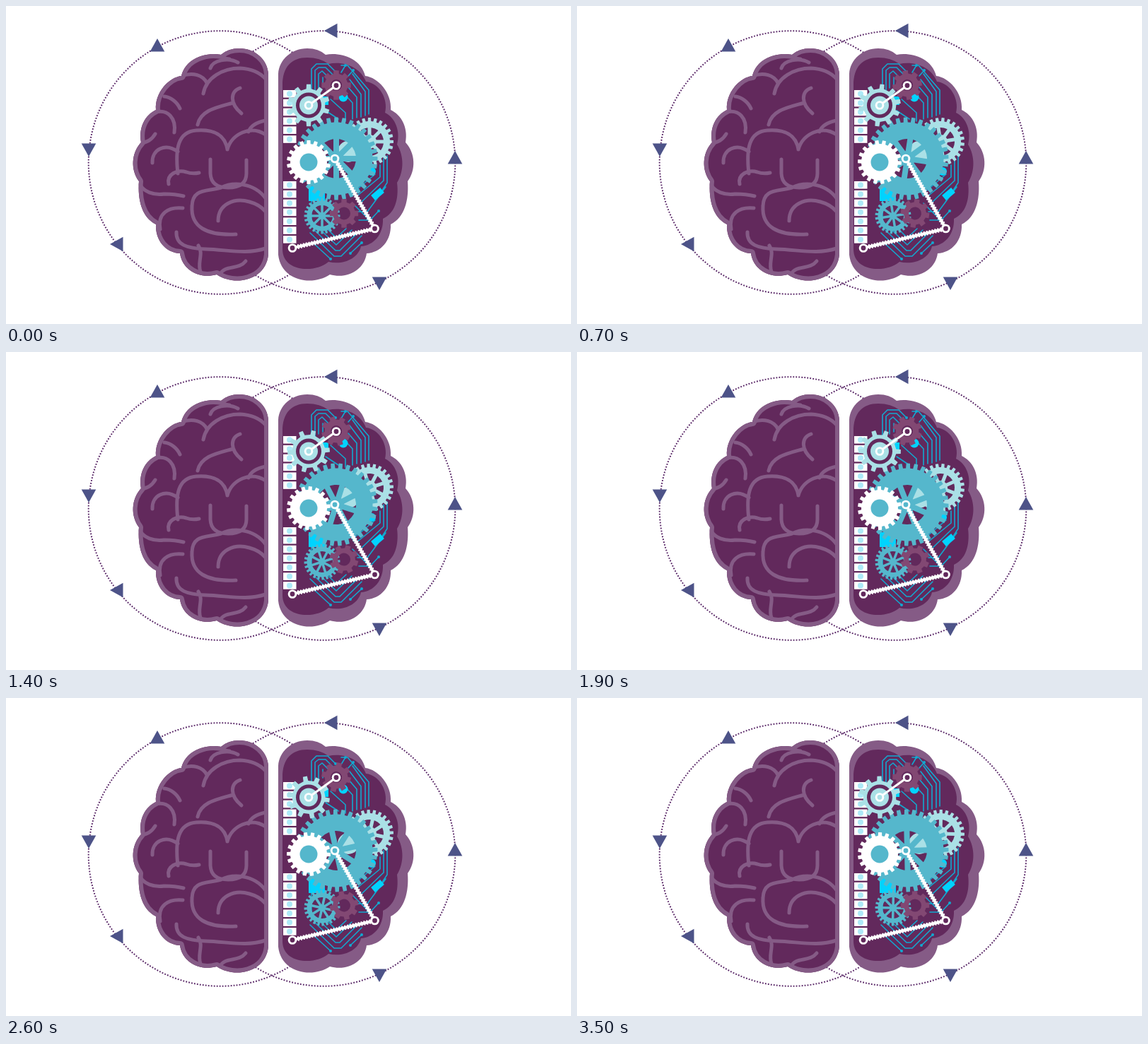
Animation, 799 px wide and 450 px high, one loop 3.6 s. Source, as an HTML page with a canvas:

```html
<!DOCTYPE html>
<html lang="en">
<head>
<meta charset="utf-8">
<title>Brain and gears</title>
<style>
html, body { margin: 0; width: 100%; height: 100%; overflow: hidden; background: #fff; }
canvas { display: block; }
</style>
</head>
<body>
<canvas id="stage" width="799" height="450"></canvas>
<script>
const ctx = document.getElementById('stage').getContext('2d');
const LOOP = 3600, STEP = 100, TAU = Math.PI * 2;
const DARK = '#62295c', RIM = '#855b86', TEAL = '#55b7cc', PALE = '#aae0e6';
const PLUM = '#824873', CYAN = '#00d3ff', WIRE = '#12a9d0', WHITE = '#fff';

const half = new Path2D(`M371 96 C370 76 352 60 330 60 Q314 60 304 69
  C285 65 254 73 248 99 C230 101 210 123 212 147 C197 154 187 172 191 193
  C177 208 176 232 188 248 C186 274 192 299 212 309 C211 332 226 349 246 350
  C249 373 273 387 298 380 C323 397 367 389 371 352 Z`);

const core = new Path2D(`M391 112 C391 86 404 73 426 73 Q444 73 456 82
  C477 77 502 87 509 107 C528 109 541 132 536 151 C551 158 558 178 553 196
  C563 212 563 234 553 250 C556 275 549 294 533 301 C534 323 520 339 502 340
  C498 358 476 367 456 362 C438 378 391 377 391 344 Z`);

const folds = new Path2D(`M289 88 C292 77 314 72 328 80 M304 68 Q306 75 316 75
  M279 124 C283 101 307 88 331 88 Q354 89 367 103
  M249 99 C264 93 279 98 284 109
  M271 168 C275 147 300 143 321 137 M331 116 C317 121 316 138 333 152
  M212 150 C229 146 241 159 238 179 M224 128 C233 129 242 136 246 145
  M243 237 C239 202 243 178 269 176 C294 174 310 183 313 203
  C319 181 346 168 367 182 M343 178 Q347 166 367 162
  M190 194 Q204 193 211 181 M207 222 C206 203 225 193 243 206
  M289 217 V237 Q290 257 314 257 Q340 257 340 237 V218 M313 201 V203
  M230 252 C227 238 242 231 255 235 Q263 238 273 236
  M188 249 C193 264 210 268 224 266 Q239 266 251 269
  M218 316 C214 293 230 284 250 286
  M367 272 C350 249 320 249 304 257 C283 263 264 258 263 283 C261 313 284 325 325 323
  M300 304 C300 280 323 271 344 277 Q359 281 367 291
  M241 320 C240 338 256 343 282 344 C315 345 339 352 367 343
  M272 339 C280 350 270 363 275 376 M303 379 C310 366 329 374 339 361`);

const wires = new Path2D(`M432 130 V89 L439 82 H455 L466 93 M437 122 V91 L442 87 H452 L464 99
  M442 116 V96 L447 92 L458 103 M448 113 V101 M474 94 L480 84 M484 99 L491 91
  M474 84 H483 L513 119 V153 M490 96 L508 121 V155 M486 104 L502 125 V157
  M484 115 L496 129 V158 M477 123 L490 137 V160 M459 132 L480 151 V163
  M452 148 L470 160 M539 212 V250 L520 279 M534 216 V247 L503 277
  M529 225 V242 L495 270 M522 238 L491 264 M515 237 L486 258 M537 256 L511 291 H497
  M527 290 L515 303 H499 M432 276 V312
  M430 321 L464 354 H474 L503 325 M436 317 L466 346 H472 L497 321
  M443 315 L467 338 L489 317 M452 313 L467 328 L481 315
  M433 334 L459 358 M490 279 L511 300 M487 350 L503 335`);

function disc(x, y, r, color) {
  ctx.fillStyle = color;
  ctx.beginPath();
  ctx.arc(x, y, r, 0, TAU);
  ctx.fill();
}

function line(points, color, width, dash = []) {
  ctx.strokeStyle = color;
  ctx.lineWidth = width;
  ctx.setLineDash(dash);
  ctx.beginPath();
  points.forEach(([x, y]) => ctx.lineTo(x, y));
  ctx.stroke();
  ctx.setLineDash([]);
}

function node(x, y, inner = DARK) {
  disc(x, y, 6.3, WHITE);
  disc(x, y, 3.4, inner);
}

// A toothed wheel with an optional hole, spokes and hub.
function gear({ x, y, r, depth, teeth, color, turn, tip = 0.23, hole = 0, spokes = 0, hub = 0, bar = 3 }) {
  ctx.save();
  ctx.translate(x, y);
  ctx.rotate(turn);
  ctx.fillStyle = ctx.strokeStyle = color;
  ctx.beginPath();
  const pitch = TAU / teeth, base = tip + 0.07;
  for (let i = 0; i < teeth; i++) {
    const mid = i * pitch - Math.PI / 2;
    [[-base, r - depth], [-tip, r], [tip, r], [base, r - depth]].forEach(([k, d]) =>
      ctx.lineTo(d * Math.cos(mid + k * pitch), d * Math.sin(mid + k * pitch)));
  }
  ctx.closePath();
  if (hole) {
    ctx.moveTo(hole, 0);
    ctx.arc(0, 0, hole, 0, TAU);
  }
  ctx.fill('evenodd');
  ctx.lineWidth = bar;
  ctx.beginPath();
  for (let i = 0; i < spokes; i++) {
    const a = i * TAU / spokes;
    ctx.moveTo(0, 0);
    ctx.lineTo((hole + 1) * Math.cos(a), (hole + 1) * Math.sin(a));
  }
  ctx.stroke();
  if (hub) disc(0, 0, hub, color);
  ctx.restore();
}

function orbits() {
  ctx.strokeStyle = '#572465';
  ctx.lineWidth = 2;
  ctx.setLineDash([1.8, 2.2]);
  for (const x of [303, 449]) {
    ctx.beginPath();
    ctx.arc(x, 221.5, 186.3, 0, TAU);
    ctx.stroke();
  }
  ctx.setLineDash([]);
  const arrows = [[460, 35, -90], [214, 56, 0], [117, 203, 180],
    [157, 337, -90], [528, 392, 180], [635, 215, 0]];
  ctx.fillStyle = '#4d5388';
  for (const [x, y, deg] of arrows) {
    ctx.save();
    ctx.translate(x, y);
    ctx.rotate(deg * Math.PI / 180);
    ctx.beginPath();
    ctx.moveTo(0, -10);
    ctx.lineTo(10.3, 8.5);
    ctx.lineTo(-10.3, 8.5);
    ctx.fill();
    ctx.restore();
  }
}

function leftHalf() {
  ctx.fillStyle = DARK;
  ctx.fill(half);
  ctx.save();
  ctx.clip(half);
  ctx.strokeStyle = RIM;
  ctx.lineWidth = 12;
  ctx.stroke(half);
  ctx.lineWidth = 5;
  ctx.stroke(folds);
  ctx.restore();
}

function rightHalf() {
  ctx.save();
  ctx.translate(756, 0);
  ctx.scale(-1, 1);
  ctx.fillStyle = RIM;
  ctx.fill(half);
  ctx.restore();
  ctx.fillStyle = DARK;
  ctx.fill(core);
}

function circuit() {
  ctx.strokeStyle = WIRE;
  ctx.lineWidth = 1.6;
  ctx.stroke(wires);
  for (const [x, y] of [[466, 93], [480, 84], [491, 91], [527, 290], [459, 358], [487, 350], [503, 335]])
    disc(x, y, 2, WIRE);
  ctx.fillStyle = CYAN;
  ctx.fillRect(428, 255, 23, 21);
  ctx.fillRect(443, 128, 13, 12);
  disc(477, 129, 6.5, CYAN);
  disc(517, 234, 6, CYAN);
  ctx.save();
  ctx.translate(525.5, 266);
  ctx.rotate(-0.7);
  ctx.fillRect(-8.5, -4.5, 17, 9);
  ctx.restore();
}

function strip(top, count) {
  for (let i = 0; i < count; i++) {
    const y = top + i * 12.85;
    ctx.fillStyle = WHITE;
    ctx.fillRect(392, y, 18.5, 10.6);
    disc(401, y + 5.3, 4, '#aeeaf8');
  }
}

function machine(phase) {
  const turn = phase * TAU / 8;
  gear({ x: 514, y: 192, r: 34, depth: 5, teeth: 24, color: PALE, turn: -turn, hole: 20, spokes: 8, hub: 10, bar: 5 });
  disc(484, 206, 15, PALE);
  gear({ x: 467, y: 216, r: 58.5, depth: 7, teeth: 32, color: TEAL, turn, hole: 28, spokes: 8, hub: 11, bar: 8 });
  gear({ x: 447, y: 297, r: 25.5, depth: 4, teeth: 24, color: TEAL, turn: -turn, hole: 15, spokes: 8, hub: 5, bar: 3.5 });
  gear({ x: 478, y: 293.5, r: 20.5, depth: 4.5, teeth: 8, color: PLUM, turn, hole: 9 });
  gear({ x: 428, y: 221, r: 31, depth: 5, teeth: 18, color: WHITE, turn: -phase * TAU / 9 });
  disc(428, 221, 12.5, TEAL);
  gear({ x: 467, y: 112, r: 21, depth: 4.5, teeth: 8, color: PLUM, turn: -turn, hole: 8 });
  gear({ x: 428, y: 140.5, r: 30, depth: 6.5, teeth: 10, tip: 0.16, color: PALE, turn: phase * TAU / 10 });
  disc(428, 140.5, 18, DARK);
  disc(428, 140.5, 13, PALE);
}

function arms() {
  line([[428, 140.5], [467, 112.5]], WHITE, 3);
  node(428, 140.5, PALE);
  node(467, 112.5);
  const joints = [[465, 216], [521.5, 315], [405, 342.5]];
  line(joints, WHITE, 4);
  line(joints, WHITE, 6.5, [2, 2]);
  joints.forEach(([x, y], i) => node(x, y, i ? DARK : TEAL));
}

function draw(now) {
  const phase = Math.floor((now % LOOP) / STEP) * STEP / LOOP;
  ctx.fillStyle = WHITE;
  ctx.fillRect(0, 0, 799, 450);
  ctx.lineCap = 'butt';
  ctx.lineJoin = 'round';
  orbits();
  ctx.lineCap = 'round';
  leftHalf();
  rightHalf();
  circuit();
  strip(119, 6);
  strip(248, 7);
  ctx.lineCap = 'butt';
  machine(phase);
  arms();
}

const start = performance.now();
function tick() {
  draw(performance.now() - start);
  requestAnimationFrame(tick);
}
tick();
</script>
</body>
</html>
```
